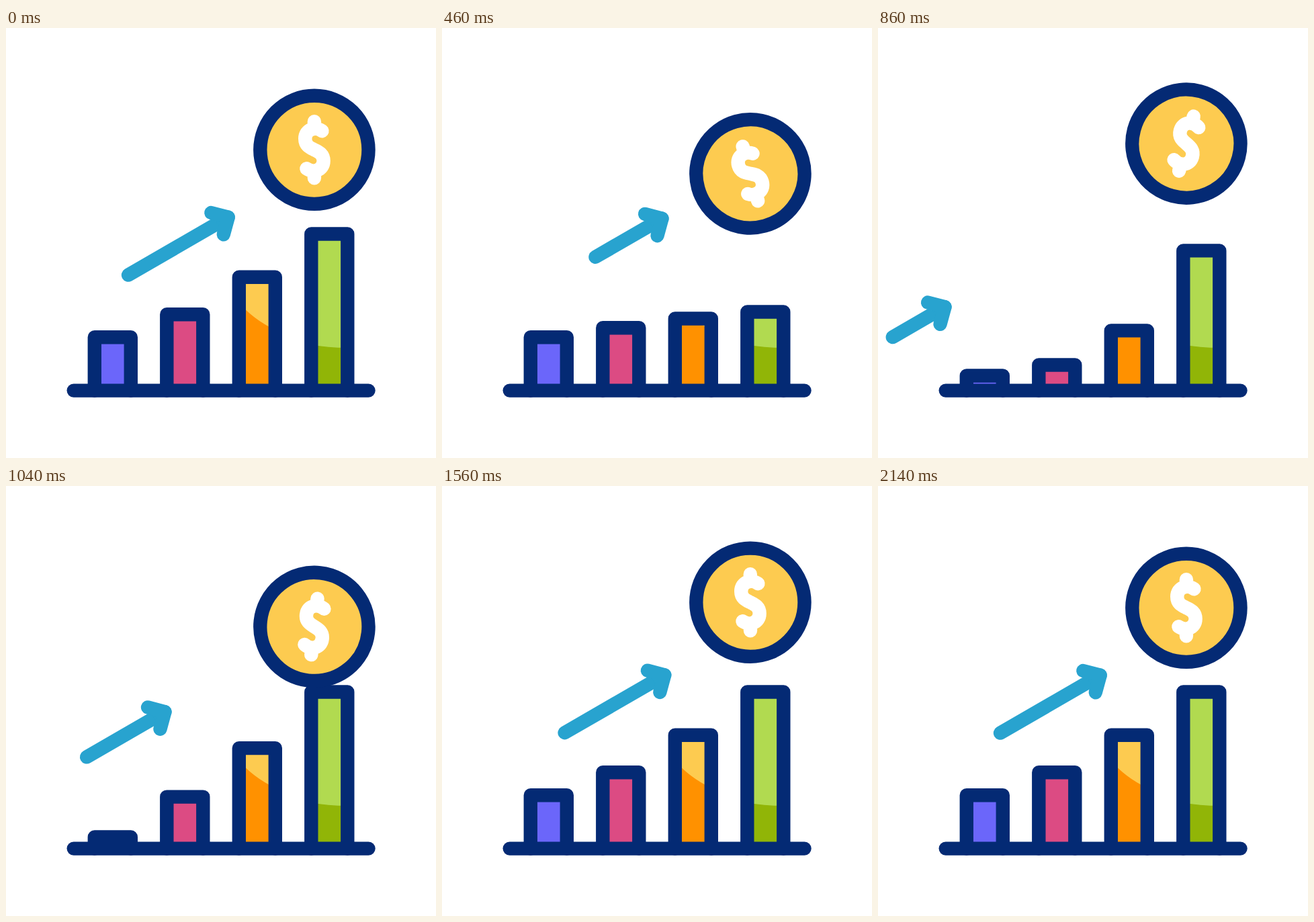
Recreate the animation shown at these times as an HTML page. Size 640x640 px, loop 2.4 s.

```html
<!DOCTYPE html>
<html lang="en">
<head>
<meta charset="utf-8">
<title>Growth chart</title>
<style>
  html, body { margin: 0; width: 100%; height: 100%; overflow: hidden; background: #fff; }
  svg { display: block; width: 100vw; height: 100vh; }
  .line { stroke: #042a74; stroke-width: 20.4; stroke-linecap: round; stroke-linejoin: round; }
  .arrow { stroke: #28a3cf; stroke-width: 20.4; stroke-linecap: round; stroke-linejoin: round; fill: #28a3cf; }
  .dollar { stroke: #fff; stroke-width: 20.4; stroke-linecap: round; stroke-linejoin: round; fill: none; }
</style>
</head>
<body>
<svg viewBox="0 0 640 640">
  <g id="bars"></g>
  <path class="line" d="M100.7 539.6H539.5"/>
  <g class="arrow">
    <path id="shaft"/>
    <path id="head" d="M305.3 275L330.7 281.7L323.7 307.3"/>
  </g>
  <g id="coin">
    <circle class="line" r="80.6" fill="#fdcb50"/>
    <path class="dollar" d="M0 -42V-32M0 32V42M11.5 -28C2 -35 -13.7 -31 -13.7 -16.5C-13.7 -6 -6 -3 0 0C6 3 13.7 6 13.7 16.5C13.7 31 -2 35 -11.5 28"/>
  </g>
</svg>
<script>
const STEP = 20, STEPS = 120, BASE = 539.6, WIDTH = 54;
const $ = id => document.getElementById(id);

function add(parent, tag, attrs) {
  const node = document.createElementNS("http://www.w3.org/2000/svg", tag);
  for (const key in attrs) node.setAttribute(key, attrs[key]);
  return parent.appendChild(node);
}

// Eased value of a track of [step, value] keys.
function track(keys, step) {
  if (step <= keys[0][0]) return keys[0][1];
  for (let i = 1; i < keys.length; i++) {
    const [s0, v0] = keys[i - 1], [s1, v1] = keys[i];
    if (step < s1) {
      const x = (step - s0) / (s1 - s0);
      return v0 + (v1 - v0) * x * x * (3 - 2 * x);
    }
  }
  return keys[keys.length - 1][1];
}

const coinY = [[0, 181.3], [17, 242], [35, 145], [53, 210], [71, 161.5], [89, 196.4], [107, 181.3]];
const coinTurn = [[0, 0], [21.4, -16], [42.8, 15], [64.2, -7], [85.6, 2.7], [107, 0]];
const tailShift = [[0, 0], [21.5, 57], [43, -185], [60, 23.7], [80, 0]];
const headShift = [[21.5, 0], [43, -267], [60, 23.7], [80, 0]];

// A bar dips by `dip` from step `start`, then returns; `shade` is a fixed lower area.
const bars = [
  { x: 131.8, top: 460.3, start: 24.5, dip: 66, fill: "#6b66fa" },
  { x: 239.3, top: 426.3, start: 15.2, dip: 80.6, fill: "#dc4b83" },
  { x: 346.8, top: 370.7, start: 10.3, dip: 113.7, fill: "#fdcb50",
    shade: "M346 408Q368 434 402 450V540H346Z", dark: "#ff9100" },
  { x: 454.3, top: 306.5, start: 2, dip: 121.2, fill: "#b1da50",
    shade: "M453 471Q478 476 510 476V540H453Z", dark: "#91b507" }
];

bars.forEach((bar, i) => {
  bar.body = add($("bars"), "path", { fill: bar.fill });
  if (bar.shade) {
    const clip = add($("bars"), "clipPath", { id: "clip" + i });
    bar.clip = add(clip, "path", {});
    add($("bars"), "path", { d: bar.shade, fill: bar.dark, "clip-path": `url(#clip${i})` });
  }
  bar.outline = add($("bars"), "path", { class: "line", fill: "none" });
});

// Point moved along the arrow's 30 degree direction.
const along = (x, y, d) => `${x + d * 0.866} ${y - d * 0.5}`;

function draw(step) {
  for (const bar of bars) {
    const { x, top, start, dip } = bar;
    const y = top + track([[start, 0], [start + 24, dip], [start + 48, 0]], step);
    const d = `M${x} ${BASE}V${y}H${x + WIDTH}V${BASE}`;
    for (const part of [bar.body, bar.clip, bar.outline]) if (part) part.setAttribute("d", d);
  }
  const tail = track(tailShift, step), head = track(headShift, step);
  $("shaft").setAttribute("d", `M${along(182, 367.6, tail)}L${along(330.7, 281.7, head)}`);
  $("head").setAttribute("transform", `translate(${along(0, 0, head)})`);
  $("coin").setAttribute("transform",
    `translate(458.9 ${track(coinY, step)}) rotate(${track(coinTurn, step)})`);
}

const begin = performance.now();
function tick() {
  draw(Math.floor((performance.now() - begin) / STEP) % STEPS);
  requestAnimationFrame(tick);
}
tick();
</script>
</body>
</html>
```
